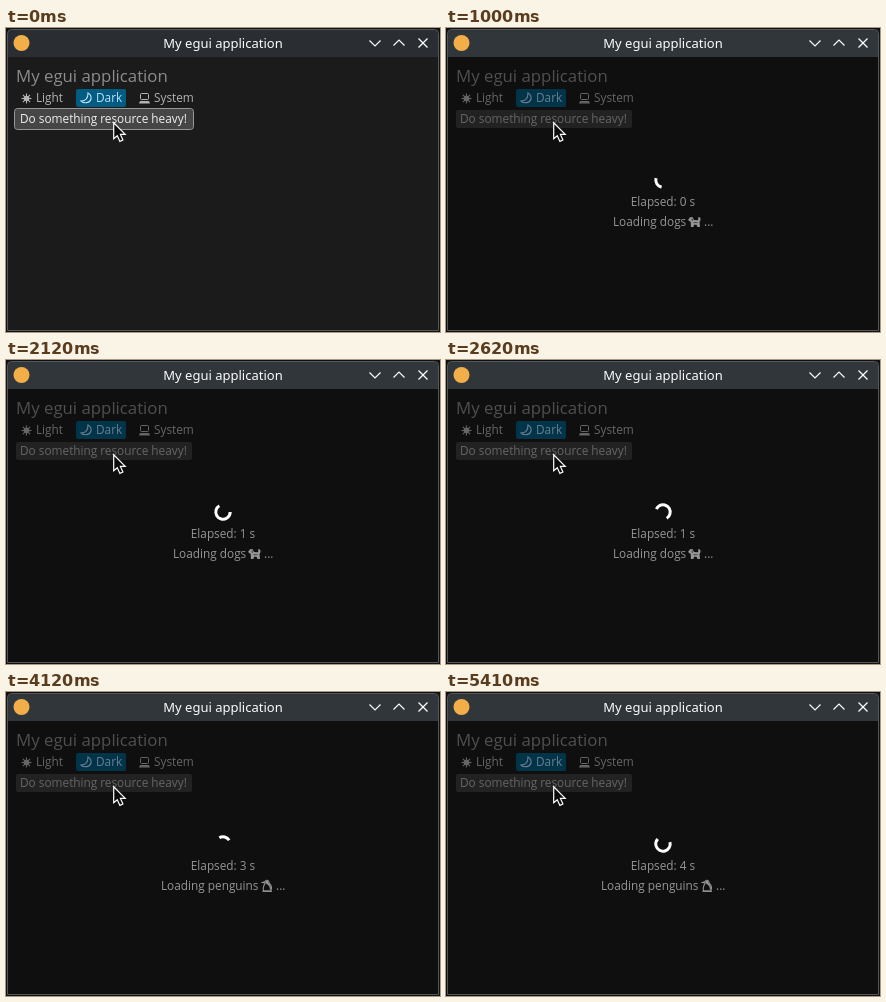
An HTML page with a canvas that plays this animation: 434 by 304 pixels, repeating every 5.45 s.

```html
<!DOCTYPE html>
<html lang="en">
<head>
<meta charset="utf-8">
<title>My egui application</title>
<style>
html, body { margin: 0; width: 100%; height: 100%; overflow: hidden; background: #111; }
canvas { display: block; width: 434px; height: 304px; }
</style>
</head>
<body>
<canvas id="stage" width="434" height="304"></canvas>
<script>
const ctx = document.getElementById('stage').getContext('2d');
const LOOP_MS = 5450;
const FPS = 24;
const PRESS = 11;        // ticks at which the state changes
const FOCUSED = 15;
const OVERLAY = 21;
const CLOCK_START = 0.9; // seconds
const SPINNER_OFFSET = 2.54;
const UI_FONT = '"Open Sans", "Noto Sans", sans-serif';
const WINDOW_CORNERS = [4, 4, 0, 0];
const gray = v => `rgb(${v},${v},${v})`;

function label(text, x, y, color, { size = 11.8, align = 'left', family = UI_FONT } = {}) {
  ctx.font = `400 ${size}px ${family}`;
  ctx.textAlign = align;
  ctx.fillStyle = color;
  ctx.fillText(text, x, y);
}

function line(points, color, width) {
  ctx.beginPath();
  points.forEach(([x, y]) => ctx.lineTo(x, y));
  ctx.strokeStyle = color;
  ctx.lineWidth = width;
  ctx.stroke();
}

function box(x, y, w, h, radius, fill, stroke) {
  ctx.beginPath();
  ctx.roundRect(x, y, w, h, radius);
  if (fill) { ctx.fillStyle = fill; ctx.fill(); }
  if (stroke) { ctx.strokeStyle = stroke; ctx.lineWidth = 1; ctx.stroke(); }
}

function shape(d, x, y, fill, stroke, width = 1) {
  const path = new Path2D(d);
  ctx.save();
  ctx.translate(x, y);
  if (fill) { ctx.fillStyle = fill; ctx.fill(path); }
  if (stroke) { ctx.strokeStyle = stroke; ctx.lineWidth = width; ctx.stroke(path); }
  ctx.restore();
}

function titleBar(n) {
  const color = n < PRESS ? '#2a2e32' : n < FOCUSED ? '#2e3237' : '#31363b';
  box(2, 2, 430, 27, WINDOW_CORNERS, color);
  ctx.beginPath();
  ctx.arc(15.5, 15, 8, 0, 2 * Math.PI);
  ctx.fillStyle = '#f2ae49';
  ctx.fill();
  const white = '#fcfcfc';
  label('My egui application', 217, 20, white,
    { size: 13, align: 'center', family: '"Noto Sans", sans-serif' });
  line([[363.5, 12.5], [369, 18], [374.5, 12.5]], white, 1.2);
  line([[387.5, 17.5], [393, 12], [398.5, 17.5]], white, 1.2);
  line([[412.5, 10.5], [421.5, 19.5]], white, 1.2);
  line([[421.5, 10.5], [412.5, 19.5]], white, 1.2);
}

function sun(x, y, color) {
  for (let i = 0; i < 8; i++) {
    const a = i * Math.PI / 4;
    const ray = r => [x + r * Math.cos(a), y + r * Math.sin(a)];
    line([ray(2), ray(5)], color, 1.1);
  }
  ctx.beginPath();
  ctx.arc(x, y, 2.8, 0, 2 * Math.PI);
  ctx.fillStyle = color;
  ctx.fill();
}

function themeRow() {
  const text = gray(180), selected = 'rgb(192,222,255)';
  sun(20.5, 70.5, text);
  label('Light', 30, 74, text);
  box(70, 61, 50, 18, 2, 'rgb(0,92,128)');
  shape('M2 -5 C2 0 0 3 -5 3 C-2 6 4 5 5 1 C5.5 -2 4 -4 2 -5Z', 80, 70, null, selected, 1.1);
  label('Dark', 90, 74, selected);
  box(134.5, 65.5, 8, 6, 1, null, text);
  shape('M-4.5 0 H4.5 L5.5 2.5 H-5.5Z', 138.5, 73, text);
  label('System', 148, 74, text);
}

function button(n) {
  let text = gray(180);
  if (n < PRESS) {
    box(8.5, 80.5, 179, 21, 3, gray(70), gray(150));
    text = gray(240);
  } else if (n <= OVERLAY) {
    box(8.5, 80.5, 179, 21, 3, gray(48), gray(255));
    text = gray(255);
  } else {
    box(10, 82, 176, 18, 2, gray(60));
  }
  label('Do something resource heavy!', 14, 95, text);
}

// The arc turns once per second while its signed length swings with a sine.
function spinner(seconds) {
  const start = seconds * 2 * Math.PI;
  const sweep = 240 * Math.PI / 180 * Math.sin(seconds);
  ctx.beginPath();
  ctx.arc(217, 152, 7.2, start, start + sweep, sweep < 0);
  ctx.strokeStyle = '#fff';
  ctx.lineWidth = 3;
  ctx.stroke();
}

function dog(x, y, color) {
  shape('M-6.5 -2 L-4.5 -4.8 L-2 -5 L-.5 -2 L3 -1.8 C5 -2 2.5 -4.5 4.5 -5 C7 -4 6 -1 5 0 L5.5 5 H3 L2 2.8 H-.5 L-1 5 H-3.6 L-3.8 0Z', x, y, color);
  line([[x - 2.5, y - 3.5], [x - 2.2, y - 1.2]], gray(25), 0.8);
  line([[x - 1, y + 0.6], [x + 3, y + 0.6]], gray(40), 0.7);
}

function cat(x, y, color) {
  shape('M-5 -2 L-4 -5.5 L-2.6 -4.2 L-1 -5 L-.5 -2 L3 .5 L4 5 H-2.5 L-2.7 0Z', x, y, color);
  shape('M3 4 C6 2 2 -1 4.5 -5', x, y, null, color, 1.2);
  line([[x - 0.5, y + 1.5], [x - 0.2, y + 5]], gray(30), 0.7);
}

function penguin(x, y, color) {
  shape('M-4.5 -3.5 L-2 -4.5 C-1 -6.5 2 -6 2 -3.5 C5 0 5 3 3.5 5 H-3.5 C-4.5 2 -3 -1 -1.8 -3Z', x, y, null, color, 1.1);
  shape('M-1.8 -4 C0 -6.5 2 -5 1.5 -3 C4.5 0 4.5 3 3 4.8 C3 1 2 -1 -.5 -2Z', x, y, color);
  line([[x - 4.5, y + 5.3], [x + 5, y + 5.3]], color, 1.2);
}

const JOBS = [
  { from: 0, text: 'Loading dogs', left: 167, icon: dog, iconX: 248.5, dots: 258 },
  { from: 2, text: 'Loading cats', left: 169, icon: cat, iconX: 247, dots: 256 },
  { from: 3, text: 'Loading penguins', left: 155, icon: penguin, iconX: 261, dots: 270 },
];

function overlay(n) {
  const seconds = n / FPS;
  ctx.globalAlpha = [0.13, 0.65][n - OVERLAY] ?? 1;
  box(2, 29, 430, 273, 0, 'rgba(0,0,0,0.44)');
  spinner(seconds + SPINNER_OFFSET);
  const elapsed = Math.max(0, Math.floor(seconds - CLOCK_START));
  const color = gray(150);
  label(`Elapsed: ${elapsed} s`, 217, 178, color, { align: 'center' });
  if (n > OVERLAY) {
    const job = JOBS.findLast(j => elapsed >= j.from);
    label(job.text, job.left, 198, color);
    job.icon(job.iconX, 194, color);
    label('...', job.dots, 198, color);
  }
  ctx.globalAlpha = 1;
}

function cursor() {
  shape('M0 0 V16 L3.6 12.9 L6.2 18.6 L9.2 17.2 L6.7 11.6 H11.5Z', 107.7, 94.8, '#0a0a0a', '#fff', 1.2);
}

function draw(ms) {
  // Ticks start on whole hundredths of a second.
  const n = Math.floor((Math.floor(ms / 10) * 10 + 9.99) * FPS / 1000);
  ctx.fillStyle = '#111';
  ctx.fillRect(0, 0, 434, 304);
  box(1.5, 1.5, 431, 301, WINDOW_CORNERS, gray(27));
  titleBar(n);
  label('My egui application', 10, 54, gray(140), { size: 16.8 });
  themeRow();
  button(n);
  if (n >= OVERLAY) overlay(n);
  cursor();
  box(1.5, 1.5, 431, 301, WINDOW_CORNERS, null, '#54575a');
}

const began = performance.now();
function tick() {
  draw((performance.now() - began) % LOOP_MS);
  requestAnimationFrame(tick);
}
tick();
</script>
</body>
</html>
```
